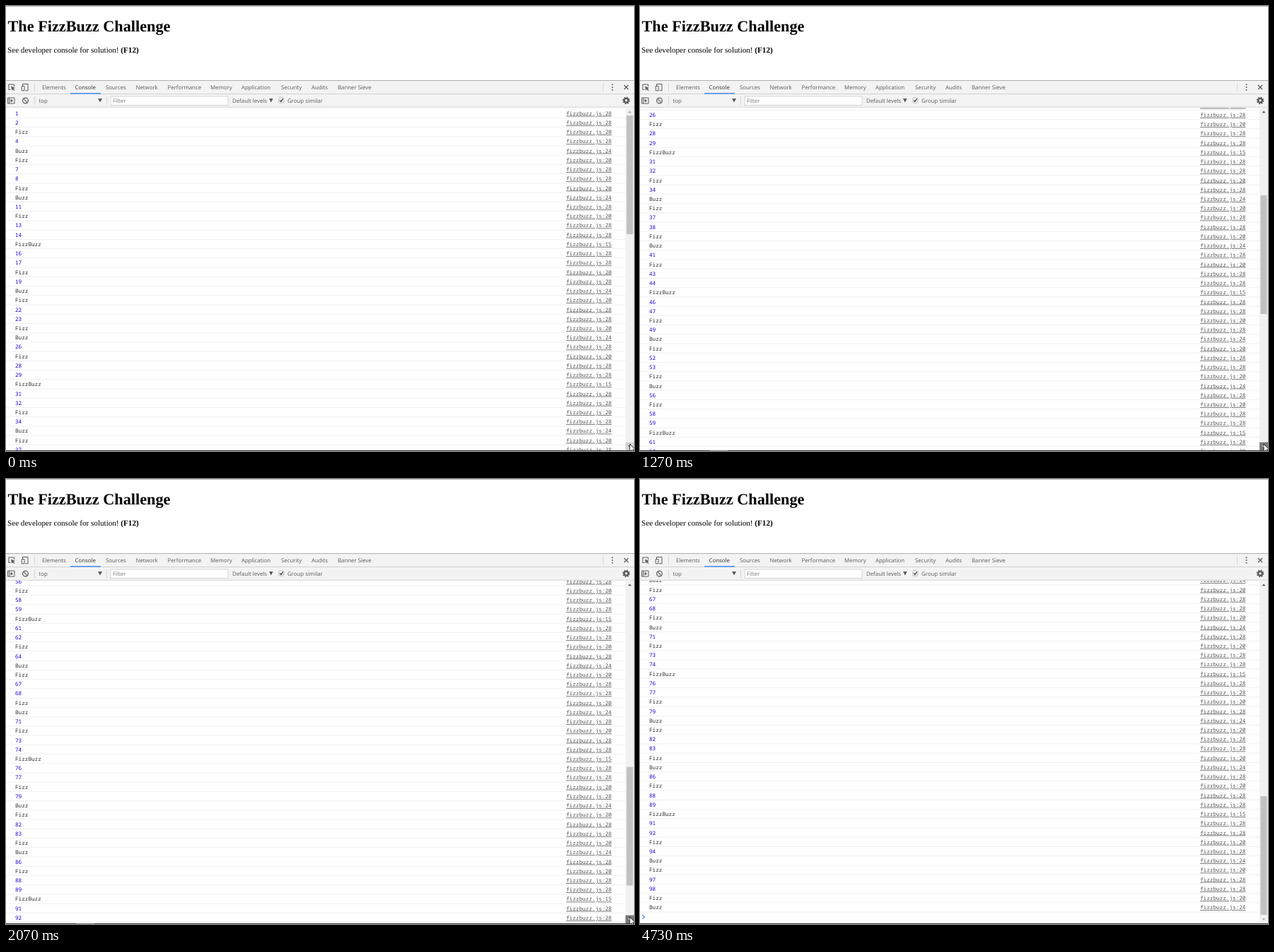
Recreate the animation shown at these times as an HTML page. Size 888 px wide and 630 px high, loop 4.79 s.

```html
<!DOCTYPE html>
<html lang="en">
<head>
<meta charset="utf-8">
<title>The FizzBuzz Challenge</title>
<style>
  html, body { margin: 0; width: 100%; height: 100%; overflow: hidden; background: #fff; }
  svg { display: block; text-rendering: geometricPrecision; }
  .page { font: 11.13px "Liberation Serif", "Times New Roman", serif; }
  .page .h { font-size: 22.25px; font-weight: bold; }
  .ui { font: 7.85px "Open Sans", "Noto Sans", sans-serif; fill: #5a5a5a; }
  .ui .on { fill: #333; }
  .ui .hint { fill: #777; }
  .log { font: 7.68px "Noto Sans Mono", "DejaVu Sans Mono", monospace; fill: #303030; }
  .log .num { fill: #1c00cf; }
  .log .link { fill: #545454; text-decoration: underline; }
  .line { fill: none; stroke: #5a5a5a; }
</style>
</head>
<body>
<svg width="888" height="630" viewBox="0 0 888 630">
  <clipPath id="view"><rect y="143.5" width="876" height="485.5"/></clipPath>
  <rect width="888" height="1" fill="#b8b8b8"/>
  <g class="page">
    <text class="h" x="2.5" y="36">The FizzBuzz Challenge</text>
    <text x="2" y="66.2">See developer console for solution! <tspan font-weight="bold">(F12)</tspan></text>
  </g>

  <g clip-path="url(#view)"><g id="log" class="log"></g></g>

  <rect y="105" width="888" height="38.5" fill="#f3f3f3"/>
  <path d="M0 105.5H888" stroke="#b0b0b0"/>
  <path d="M0 124.5H888M0 143.2H888M40.5 109V121M40.5 128V140M142.5 128V140M844.5 109V121" stroke="#ccc" stroke-width=".8"/>
  <rect x="91" y="123" width="43" height="1.6" fill="#4f94f0"/>
  <rect x="148" y="128" width="166" height="12.4" fill="#fff" stroke="#ccc" stroke-width=".8"/>
  <g id="tools" class="ui"></g>

  <!-- toolbar icons -->
  <g class="line">
    <path d="M11.5 114V111H3.8V118.5H6.5M23.5 113V110.5H31V119.8H27.5M22.2 113.5H26V119.8H22.2Z"/>
    <path d="M2.5 130H12V138H2.5ZM4.6 130V138"/>
    <circle cx="27.5" cy="134" r="3.9" stroke-width="1.2"/>
    <path d="M24.8 131.2L30.2 136.8" stroke-width="1.2"/>
    <path d="M874 112L880 118M880 112L874 118" stroke-width="1.3"/>
    <circle cx="877" cy="133.8" r="2.9" stroke-width="2.4"/>
    <circle cx="877" cy="133.8" r="4.6" stroke-width="1.5" stroke-dasharray="1.806"/>
    <rect x="385.8" y="130" width="7" height="7" rx="1" fill="#fff" stroke="#aaa" stroke-width=".8"/>
    <path d="M387.2 133.5L388.8 135.3L391.6 131.3" stroke="#333" stroke-width="1.3"/>
  </g>
  <g fill="#5a5a5a">
    <path d="M7 113.5L13 116L10.6 117L12.5 119.2L11.4 120L9.6 117.9L8.3 119.8Z"/>
    <path d="M6.5 131.6L10.2 134L6.5 136.4ZM130 131H136L133 136.5ZM372 131H377.6L374.8 136.5Z"/>
    <circle cx="857.5" cy="111.3" r="1"/><circle cx="857.5" cy="115" r="1"/><circle cx="857.5" cy="118.7" r="1"/>
  </g>

  <!-- scrollbar -->
  <rect x="876" y="143.5" width="12" height="486" fill="#f1f1f1"/>
  <rect id="thumb" x="877.4" width="9.2" height="168" fill="#c1c1c1"/>
  <path id="up" d="M879.6 151.2L882 148.6L884.4 151.2Z"/>
  <rect id="button" x="876" y="617.6" width="12" height="11.8"/>
  <path id="down" d="M879.6 622.2H884.4L882 624.8Z"/>

  <rect y="629" width="888" height="1" fill="#3c3c3c"/>
  <rect id="mark" x="99" y="629" width="26" height="1" fill="#777"/>
  <path id="cursor" d="M0 0V11L2.5 8.7L4.2 12.6L5.9 11.8L4.2 8H7.6Z" fill="#fff" stroke="#000" stroke-width=".8"/>
</svg>
<script>
const LOOP = 4790, ROW = 13.229, END = 855;
const el = id => document.getElementById(id);
const text = (x, y, s, cls = "") => `<text x="${x}" y="${y}" class="${cls}">${s}</text>`;

const tabs = [["Elements", 51], ["Console", 97.5, "on"], ["Sources", 141], ["Network", 183.5],
  ["Performance", 228.5], ["Memory", 289], ["Application", 333], ["Security", 389],
  ["Audits", 432], ["Banner Sieve", 469]];
const tools = [["top", 46.5], ["Filter", 151, "hint"], ["Default levels", 320], ["Group similar", 398]];
const labels = (list, y) => list.map(([s, x, cls]) => text(x, y, s, cls)).join("");
el("tools").innerHTML = labels(tabs, 118) + labels(tools, 136.9);

function row(n) {
  const word = (n % 3 ? "" : "Fizz") + (n % 5 ? "" : "Buzz");
  const source = { FizzBuzz: 15, Fizz: 20, Buzz: 24 }[word] || 28;
  const y = 154.7 + (n - 1) * ROW;
  return text(13, y, word || n, word ? "" : "num") +
    text(792, y, "fizzbuzz.js:" + source, "link") +
    `<path d="M0 ${y + 3.7}H876" stroke="#f0f0f0"/>`;
}
let rows = "";
for (let n = 1; n <= 100; n++) rows += row(n);
const promptY = 152 + 100 * ROW;
el("log").innerHTML = rows +
  `<path d="M3.3 ${promptY - 2.7}l3 2.7l-3 2.7" fill="none" stroke="#367cf1" stroke-width="1.2"/>`;

// [tick, scroll offset]; the screen refreshes 15 times a second
const stops = [[4, 0], [5, 8], [6, 21], [7, 31], [8, 33], [9, 33], [10, 40], [11, 67],
  [19, 328.5], [25, 543.6], [31, 734.6], [34, 831], [35, 850], [36, END]];
function scrollAt(k) {
  const i = stops.findIndex(s => s[0] >= k);
  if (i < 0) return END;
  if (i === 0) return 0;
  const [a, from] = stops[i - 1], [b, to] = stops[i];
  return from + (to - from) * (k - a) / (b - a);
}
// pointer places while it leaves the stage
const leave = { 52: [879.5, 621], 53: [740, 614.5], 54: [533.5, 624] };

function draw(now) {
  const k = Math.floor((now % LOOP + 3.4) * 0.015);
  const y = scrollAt(k);
  const [back, arrow] = k < 5 ? ["#d2d2d2", "#505050"]
    : k < 36 ? ["#787878", "#fff"] : ["#f1f1f1", "#a3a3a3"];
  const [cx, cy] = k < 52 ? [882, 620] : leave[k] || [0, 700];
  el("log").setAttribute("transform", `translate(0 ${-y})`);
  el("thumb").setAttribute("y", 155 + y * 0.3439);
  el("up").setAttribute("fill", y > 0 ? "#505050" : "#a3a3a3");
  el("button").setAttribute("fill", back);
  el("down").setAttribute("fill", arrow);
  el("mark").style.display = k >= 5 && k < 71 ? "" : "none";
  el("cursor").setAttribute("transform", `translate(${cx} ${cy})`);
}
let start;
function tick(now) {
  start ??= now;
  draw(now - start);
  requestAnimationFrame(tick);
}
draw(0);
requestAnimationFrame(tick);
</script>
</body>
</html>
```
